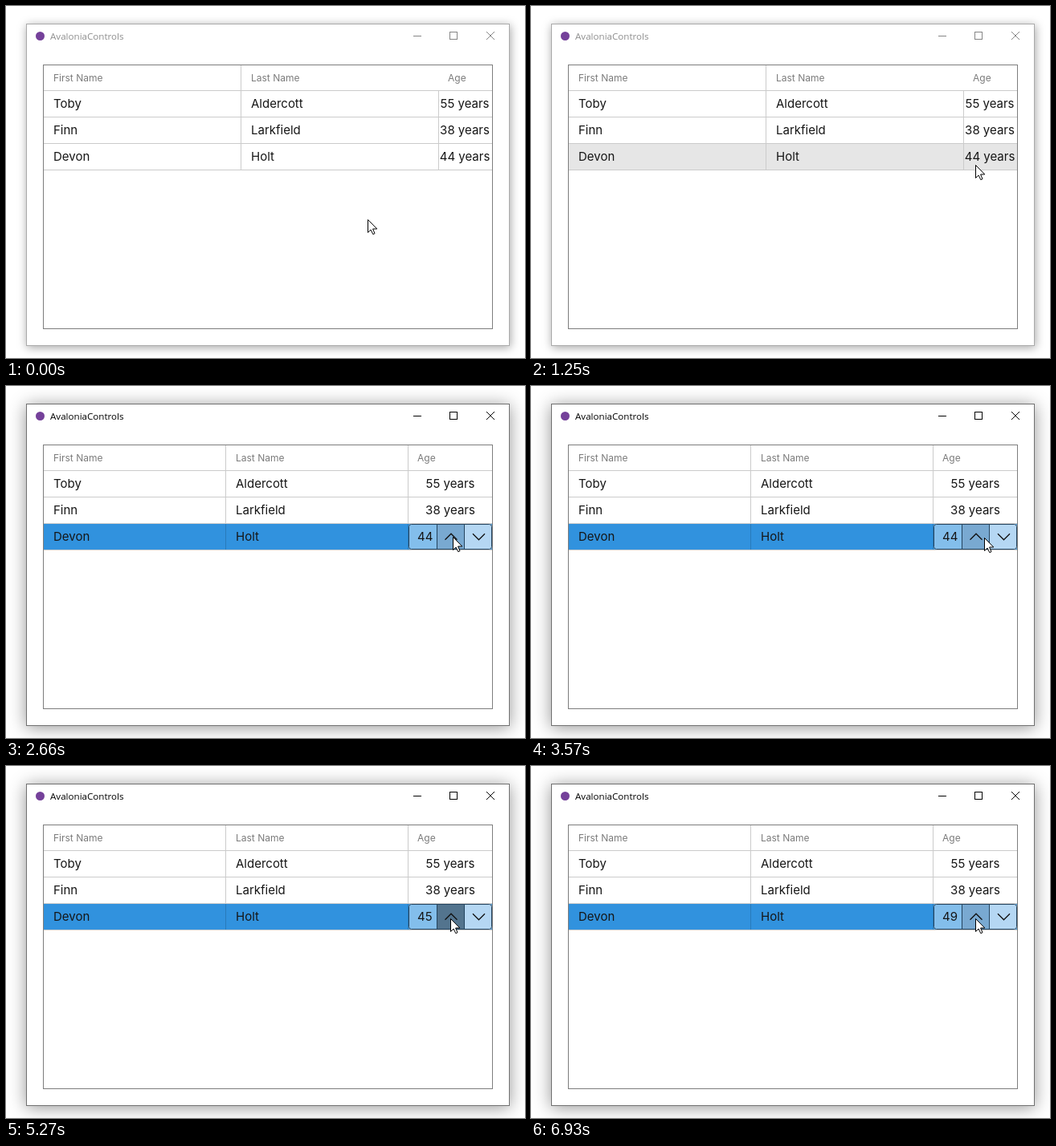
An HTML page with a canvas that plays this animation: 646 by 439 pixels, repeating every 8000 ms.

```html
<!DOCTYPE html>
<html lang="en">
<head>
<meta charset="utf-8">
<style>
html, body { margin: 0; overflow: hidden; background: #fff; }
canvas { display: block; }
</style>
</head>
<body>
<canvas id="stage" width="646" height="439"></canvas>
<script>
const ctx = document.getElementById('stage').getContext('2d');
const LOOP = 8000, STEP = 57;
const ACTIVATE = 1560, EDIT = 2660, PRESS = 110;
const LEFT = 47, RIGHT = 605, TOP = 74, ROW = 33;
const INK = '#161616', RULE = '#cbcbcb', BLUE = '#3192de';
const rowTop = i => TOP - 1 + ROW * i;

const people = [
  ['Toby', 'Aldercott', '55 years'],
  ['Finn', 'Larkfield', '38 years'],
  ['Devon', 'Holt', '44 years'],
];
const moves = [
  { start: 323, time: 684, to: [550, 204] },
  { start: 1010, time: 300, to: [555, 194] },
  { start: 2053, time: 107, to: [556, 188] },
  { start: 3103, time: 757, to: [575, 190] },
  { start: 4173, time: 456, to: [553, 190] },
];
const clicks = [5210, 5810, 6040, 6260, 6810];

// The pointer accelerates into each stop and is redrawn once per STEP.
function pointerAt(t) {
  let pos = [450, 266];
  for (const { start, time, to } of moves) {
    if (t < start) break;
    const elapsed = Math.floor((t - start) / STEP) * STEP;
    const k = Math.min(1, elapsed / time) ** 1.6;
    pos = pos.map((p, i) => Math.round(p + (to[i] - p) * k));
  }
  return pos;
}

function rect(x, y, w, h, color) {
  ctx.fillStyle = color;
  ctx.fillRect(x, y, w, h);
}

function frame(x, y, w, h, color, width = 1) {
  ctx.strokeStyle = color;
  ctx.lineWidth = width;
  ctx.strokeRect(x + width / 2, y + width / 2, w - width, h - width);
}

function line(color, width, ...points) {
  ctx.beginPath();
  points.forEach(p => ctx.lineTo(...p));
  ctx.strokeStyle = color;
  ctx.lineWidth = width;
  ctx.stroke();
}

function text(str, x, y, size, color, family = 'Inter', align = 'left') {
  ctx.font = `${size}px "${family}", sans-serif`;
  ctx.textAlign = align;
  ctx.fillStyle = color;
  ctx.fillText(str, x, y);
}

function drawWindow(active) {
  const ink = active ? '#000' : '#858585';
  ctx.save();
  ctx.shadowColor = `rgba(0,0,0,${active ? .42 : .36})`;
  ctx.shadowBlur = active ? 20 : 11;
  ctx.shadowOffsetX = active ? 0 : 1;
  ctx.shadowOffsetY = 2;
  rect(25, 22, 602, 402, '#fff');
  ctx.restore();
  frame(25, 22, 602, 402, active ? '#707070' : '#aaa');

  ctx.beginPath();
  ctx.arc(42.5, 37.5, 5.5, 0, Math.PI * 2);
  ctx.fillStyle = '#75419a';
  ctx.fill();
  text('AvaloniaControls', 55, 42, 11.6, active ? '#000' : '#8e8e8e', 'Open Sans');

  rect(507, 37, 10, 1, ink);
  frame(552, 32, 10, 10, ink);
  line(ink, 1, [598, 32], [608, 42]);
  line(ink, 1, [608, 32], [598, 42]);
}

function spinButton(x, w, color, dir) {
  rect(x, 172, w, 32, color);
  const mid = x + w / 2 + .5, y = 188;
  line('#111', 1.3, [mid - 7.5, y - 3.8 * dir], [mid, y + 3.8 * dir], [mid + 7.5, y - 3.8 * dir]);
}

function drawSpinner(t) {
  const edge = '#24445f', hover = '#79a9d1', idle = '#b5d7f3';
  const overDown = pointerAt(t)[0] >= 567;
  const pressed = clicks.some(c => t >= c && t < c + PRESS);
  const value = 44 + clicks.filter(c => t >= c + PRESS / 2).length;
  ctx.save();
  ctx.beginPath();
  ctx.roundRect(501, 172, 104, 32, 3);
  ctx.clip();
  rect(501, 172, 36, 32, '#83beeb');
  spinButton(537, 33, pressed ? '#53748e' : overDown ? idle : hover, -1);
  spinButton(571, 34, overDown ? hover : idle, 1);
  ctx.restore();
  for (const x of [536, 570]) rect(x, 172, 1, 32, edge);
  ctx.beginPath();
  ctx.roundRect(501.5, 172.5, 103, 31, 3);
  ctx.lineWidth = 1;
  ctx.strokeStyle = edge;
  ctx.stroke();
  text(value, 512, 193, 15, INK);
}

function drawGrid(t) {
  const selected = t >= ACTIVATE, editing = t >= EDIT;
  const hovered = pointerAt(t)[1] < 204;
  const [col2, col3, ageMid] = editing ? [273, 500, 553] : [292, 538, 571];
  const last = rowTop(3);

  for (let i = 1; i <= 4; i++) rect(LEFT, rowTop(i) - 1, RIGHT - LEFT, 1, RULE);
  if (selected || hovered) rect(LEFT, last, RIGHT - LEFT, 32, selected ? BLUE : '#e6e6e6');
  for (const x of [col2, col3]) {
    const top = x === 538 ? 106 : TOP;
    rect(x, top, 1, 205 - top, RULE);
    if (selected) rect(x, last, 1, 32, '#297bbb');
  }

  ['First Name', 'Last Name', 'Age'].forEach((label, i) =>
    text(label, [LEFT, col2 + 1, col3][i] + 12, 94, 12, '#7b7b7b'));
  people.forEach(([first, family, age], i) => {
    const y = 127 + ROW * i;
    text(first, LEFT + 12, y, 15, INK);
    text(family, col2 + 13, y, 15, INK);
    if (i < 2 || !editing) text(age, ageMid, y, 15, INK, 'Inter', 'center');
  });

  if (editing) drawSpinner(t);
  else if (selected) {
    frame(538, 172, 67, 32, '#000', 2);
    frame(540, 174, 63, 28, '#a9d0f0');
  }
  frame(LEFT - 1, TOP - 1, 560, 330, '#7d7d7d');
}

function drawPointer(x, y) {
  const arrow = new Path2D('M0 0V16L3.6 12.6 6.3 18.2 8.5 17.2 6.1 11.5H11.3Z');
  ctx.save();
  ctx.translate(x + .5, y + .5);
  ctx.fillStyle = '#fff';
  ctx.fill(arrow);
  ctx.strokeStyle = '#000';
  ctx.lineWidth = 1;
  ctx.stroke(arrow);
  ctx.restore();
}

function draw(t) {
  rect(0, 0, 646, 439, '#fff');
  drawWindow(t >= ACTIVATE);
  drawGrid(t);
  drawPointer(...pointerAt(t));
}

const begin = performance.now();
function tick() {
  draw((performance.now() - begin) % LOOP);
  requestAnimationFrame(tick);
}
tick();
</script>
</body>
</html>
```
